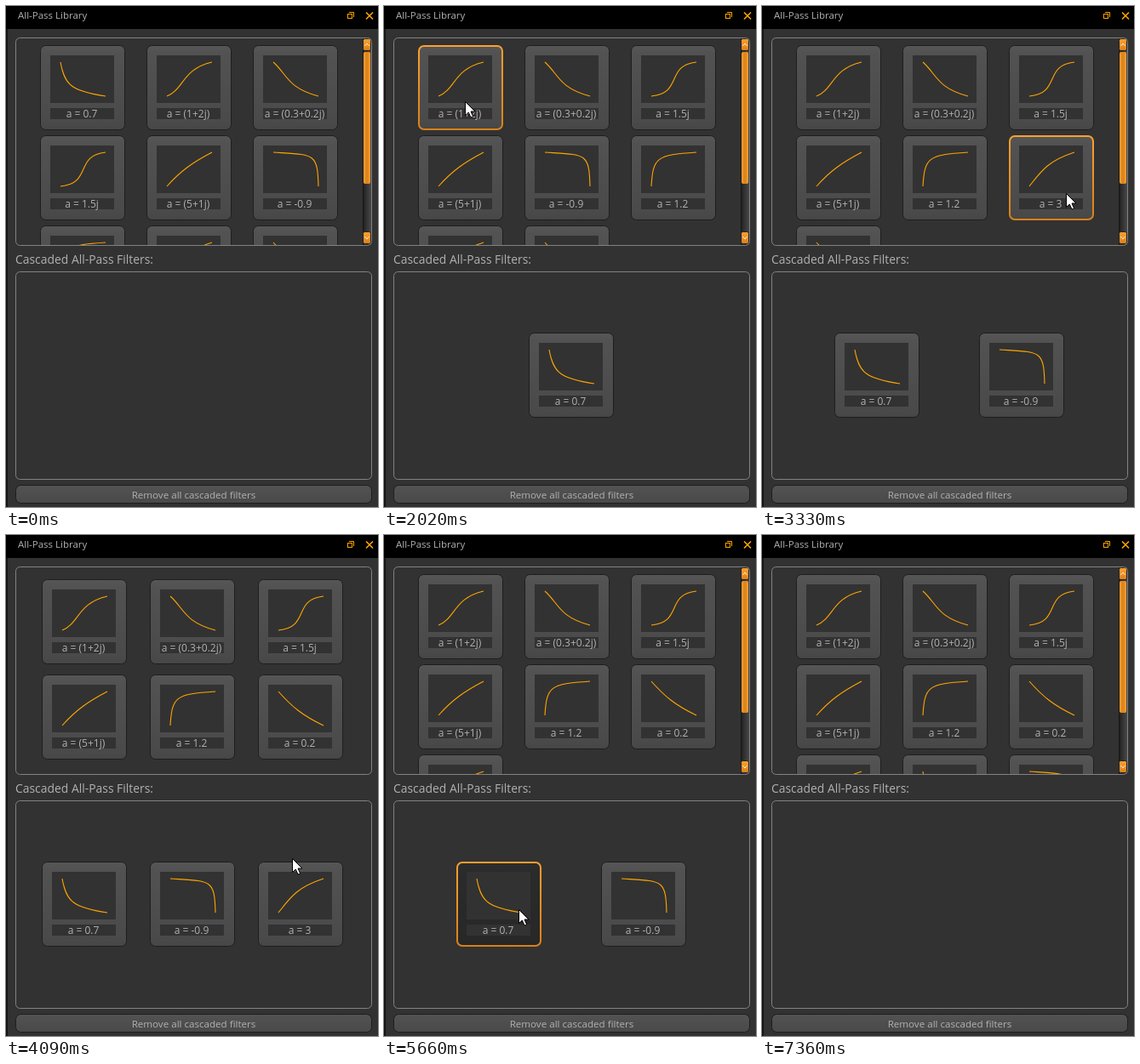
An HTML page with a canvas for the animation above (8.48 s loop, 437 px wide and 589 px high).

```html
<!DOCTYPE html>
<html>
<head>
<meta charset="utf-8">
<title>All-Pass Library</title>
<style>
html, body { margin: 0; width: 100%; height: 100%; overflow: hidden; background: #323232; }
canvas { display: block; width: 437px; height: 589px; }
</style>
</head>
<body>
<canvas id="stage" width="437" height="589"></canvas>
<script>
const ctx = document.getElementById('stage').getContext('2d');
const LOOP = 8480, ENTER = 1560, LEAVE = 7360, STEP = 60;
const ORANGE = '#ffa02f', DEEP = '#d7801a', TEXT = '#b1b1b1', BACK = '#323232';
const UP = ['#565656', '#525252', '#4e4e4e', '#4a4a4a', '#464646'];
const DOWN = ['#2d2d2d', '#2b2b2b', '#292929', '#282828', '#252525'];

// Phase curves inside a 75 x 56 preview, in library order
const curves = {
  '0.7': 'M12 8C17 36 26 42 65 48',
  '(1+2j)': 'M12 48C32 40 30 16 65 8',
  '(0.3+0.2j)': 'M12 8C28 22 28 38 65 48',
  '1.5j': 'M12 48C50 44 28 12 65 8',
  '(5+1j)': 'M12 48C28 30 42 20 65 8',
  '-0.9': 'M12 8C60 11 64 8 65 48',
  '1.2': 'M12 48C14 14 18 11 65 8',
  '3': 'M12 48C26 30 34 18 65 8',
  '0.2': 'M12 8C28 26 40 36 65 48'
};
const names = ['0.7', '(1+2j)', '(0.3+0.2j)', '1.5j', '(5+1j)', '-0.9', '1.2', '3', '0.2'];
const paths = Object.fromEntries(names.map(n => [n, new Path2D(curves[n])]));

// Press time, release time, filter that changes list
const clicks = [
  [1900, 1960, '0.7'], [2800, 2920, '-0.9'], [3510, 3570, '3'],
  [4520, 4640, '3'], [5660, 5720, '0.7'], [6870, 6990, '-0.9']
];
const pointerKeys = [
  [1560, 2, 226], [1800, 95, 112], [2330, 95, 112], [2680, 213, 223],
  [2980, 213, 223], [3330, 357, 220], [3640, 357, 220], [4030, 340, 324],
  [4090, 336, 380], [4330, 339, 440], [4760, 339, 440], [5350, 158, 440],
  [5780, 158, 440], [6320, 212, 513], [6510, 212, 513], [6810, 226, 572],
  [7120, 226, 572], [7360, 231, 589]
];
const moveStarts = [1560, 2330, 2680, 3210, 4090, 4520, 5660, 6510, 7360];
const arrow = new Path2D('M.5 .5V16.5L4.3 13L7 19L9.6 17.9L7 12H12Z');

function stepped(t) {
  const start = moveStarts.filter(s => s <= t).pop();
  return start === undefined ? t : start + Math.floor((t - start) / STEP) * STEP;
}

function pointerAt(t) {
  if (t < ENTER || t >= LEAVE) return null;
  const i = pointerKeys.findIndex(k => k[0] > t);
  const [t0, x0, y0] = pointerKeys[i - 1], [t1, x1, y1] = pointerKeys[i];
  const u = (t - t0) / (t1 - t0);
  return { x: Math.round(x0 + (x1 - x0) * u), y: Math.round(y0 + (y1 - y0) * u) };
}

function listsAt(t) {
  let library = [...names], cascade = [];
  for (const [, release, name] of clicks) {
    if (t < release) break;
    const without = list => list.filter(n => n !== name);
    if (cascade.includes(name)) {
      cascade = without(cascade);
      library.push(name);
    } else {
      library = without(library);
      cascade.push(name);
    }
  }
  return { library, cascade };
}

function fill(color, x, y, w, h) {
  ctx.fillStyle = color;
  ctx.fillRect(x, y, w, h);
}

function gradient(x0, y0, x1, y1, colors, stops) {
  const g = ctx.createLinearGradient(x0, y0, x1, y1);
  colors.forEach((c, i) => g.addColorStop(stops ? stops[i] : i / (colors.length - 1), c));
  return g;
}

function text(str, x, y, size, align = 'left', color = TEXT) {
  ctx.font = `${size}px "Open Sans", "Noto Sans", sans-serif`;
  ctx.textAlign = align;
  ctx.fillStyle = color;
  ctx.fillText(str, x, y);
}

function roundBox(x, y, w, h, r) {
  ctx.beginPath();
  ctx.roundRect(x, y, w, h, r);
}

function line(color, width, ...points) {
  ctx.beginPath();
  points.forEach(([x, y]) => ctx.lineTo(x, y));
  ctx.strokeStyle = color;
  ctx.lineWidth = width;
  ctx.stroke();
}

function button(x, y, w, h, pointer, pressed) {
  const hover = pointer && pointer.x >= x && pointer.x < x + w &&
    pointer.y >= y && pointer.y < y + h;
  const border = hover ? 2 : 1;
  roundBox(x + border / 2, y + border / 2, w - border, h - border, 6);
  ctx.fillStyle = gradient(0, y, 0, y + h, hover && pressed ? DOWN : UP, [0, 0.1, 0.5, 0.9, 1]);
  ctx.fill();
  ctx.strokeStyle = hover ? gradient(0, y, 0, y + h, [ORANGE, DEEP]) : '#1e1e1e';
  ctx.lineWidth = border;
  ctx.stroke();
}

function card(name, x, y, pointer, pressed) {
  button(x, y, 100, 100, pointer, pressed);
  fill(BACK, x + 12, y + 12, 75, 56);
  fill(BACK, x + 12, y + 74, 75, 13);
  ctx.save();
  ctx.translate(x + 12, y + 12);
  ctx.strokeStyle = '#ffa500';
  ctx.lineWidth = 1.1;
  ctx.stroke(paths[name]);
  ctx.restore();
  text('a = ' + name, x + 49, y + 85, 12, 'center');
}

function panel(y, h) {
  roundBox(11.5, y + 0.5, 418, h - 1, 5);
  ctx.strokeStyle = '#828282';
  ctx.lineWidth = 1;
  ctx.stroke();
}

function scrollbar() {
  fill(gradient(419, 0, 429, 0, ['#121212', '#282828', '#484848'], [0, 0.2, 1]), 419, 38, 10, 243);
  for (const [y, dir] of [[38, -1], [265, 1]]) {
    roundBox(419.5, y + 0.5, 9, 14, 2);
    ctx.fillStyle = gradient(0, y, 0, y + 15, [ORANGE, DEEP]);
    ctx.fill();
    ctx.strokeStyle = '#222';
    ctx.lineWidth = 1;
    ctx.stroke();
    const mid = y + 7.5;
    line('#fff0d8', 1, [421.5, mid - dir * 1.5], [424, mid + dir * 1.5], [426.5, mid - dir * 1.5]);
  }
  roundBox(420, 54, 8, 155, 2);
  ctx.fillStyle = gradient(420, 0, 428, 0, [ORANGE, DEEP, ORANGE]);
  ctx.fill();
}

function titleBar() {
  fill('#000', 0, 0, 437, 27);
  text('All-Pass Library', 14, 15, 11.5);
  ctx.strokeStyle = '#ffa500';
  ctx.lineWidth = 1;
  ctx.strokeRect(401.5, 9.5, 5, 5);
  line('#ffa500', 1, [403, 7.5], [408.5, 7.5], [408.5, 13]);
  line('#ffa500', 1.6, [423, 7.5], [431, 15.5]);
  line('#ffa500', 1.6, [431, 7.5], [423, 15.5]);
}

function draw(time) {
  const t = stepped(time);
  const pointer = pointerAt(t);
  const pressed = clicks.some(([down, up]) => t >= down && t < up);
  const { library, cascade } = listsAt(t);

  fill(BACK, 0, 0, 437, 589);
  titleBar();
  if (pointer && pointer.x < 4) fill(DEEP, 0, 0, 2, 589);
  else fill('#141414', 0, 27, 2, 562);

  ctx.save();
  ctx.beginPath();
  ctx.rect(12, 38, 417, 243);
  ctx.clip();
  const scrolls = library.length > 6;
  const [left, top, dx, dy] = scrolls ? [40, 46, 125, 106] : [42, 52, 127, 112];
  const inLibrary = pointer && pointer.y < 281 ? pointer : null;
  library.forEach((name, i) =>
    card(name, left + i % 3 * dx, top + Math.floor(i / 3) * dy, inLibrary, pressed));
  if (scrolls) scrollbar();
  ctx.restore();
  panel(37, 245);

  text('Cascaded All-Pass Filters:', 11, 303, 13.9);
  panel(312, 245);
  const [first, gap] = [[0, 0], [170, 0], [85, 170], [42, 127]][cascade.length];
  cascade.forEach((name, i) => card(name, first + i * gap, 384, pointer, pressed));

  button(11, 563, 419, 22, pointer, pressed);
  text('Remove all cascaded filters', 220.5, 579, 11.6, 'center');

  if (pointer) {
    ctx.save();
    ctx.translate(pointer.x, pointer.y);
    ctx.fillStyle = '#fff';
    ctx.fill(arrow);
    ctx.strokeStyle = '#000';
    ctx.lineWidth = 1;
    ctx.stroke(arrow);
    ctx.restore();
  }
}

const began = performance.now();
function tick() {
  draw((performance.now() - began) % LOOP);
  requestAnimationFrame(tick);
}
tick();
</script>
</body>
</html>
```
